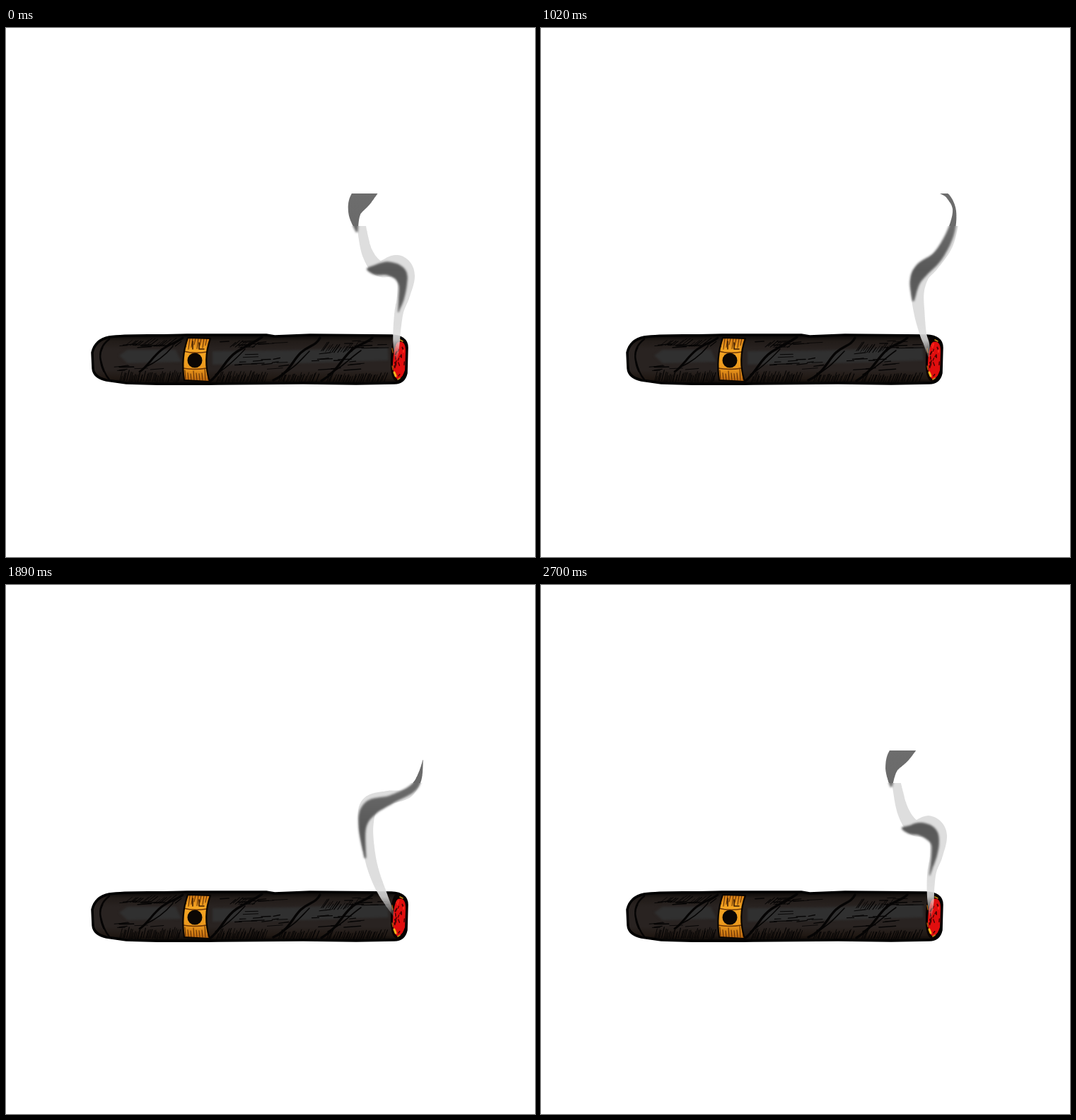
Animation, 748 px wide and 748 px high, one loop 2.73 s. Source, as an HTML page with a canvas:

```html
<!DOCTYPE html>
<html lang="en">
<head>
<meta charset="utf-8">
<title>Smoking cigar</title>
<style>
html, body { margin: 0; width: 100%; height: 100%; overflow: hidden; background: #fff; }
canvas { position: absolute; left: 0; top: 0; width: 748px; height: 748px; }
</style>
</head>
<body>
<canvas id="cigar" width="748" height="748"></canvas>
<canvas id="smoke" width="748" height="748"></canvas>
<script>
const LOOP = 2730, STEP = 30;

function drawCigar(c) {
  let seed = 11;
  const rnd = () => (seed = (seed * 16807) % 2147483647) / 2147483647;
  const body = new Path2D('M146 437C175 433 210 436 256 434L368 434 380 436 430 434 545 435Q567 436 567 452L566 488Q563 502 549 502L495 503 420 502 300 503Q215 504 170 502L142 498Q124 494 123 481L122 459Q126 441 146 437Z');
  const line = (d, w, color = '#050404') => {
    c.strokeStyle = color;
    c.lineWidth = w;
    c.stroke(new Path2D(d));
  };
  const fill = (d, color) => {
    c.fillStyle = color;
    c.fill(new Path2D(d));
  };
  // short strokes scattered in a slanted strip
  const hatch = (x, y, w, n, len, slope) => {
    for (let i = 0; i < n; i++) {
      const px = x + w * i / n + rnd() * 2, l = len * (.5 + rnd() * .5);
      line(`M${px} ${y + rnd() * 3}l${l * slope} ${-l}`, .8 + rnd() * .5);
    }
  };
  const grain = (x, y, w, h, n) => {
    for (let i = 0; i < n; i++)
      line(`M${x + rnd() * w} ${y + rnd() * h}l${8 + rnd() * 18} ${-2 + rnd() * 2}`, .8 + rnd() * .7);
  };

  c.lineCap = c.lineJoin = 'round';
  c.save();
  c.clip(body);
  const tone = c.createLinearGradient(0, 434, 0, 504);
  [[0, '#080605'], [.12, '#211b18'], [.3, '#292321'], [.7, '#292321'], [.88, '#201813'], [1, '#060403']]
    .forEach(([p, col]) => tone.addColorStop(p, col));
  c.fillStyle = tone;
  c.fillRect(110, 425, 470, 90);

  c.filter = 'blur(1.5px)';
  fill('M160 463L172 455 240 455 248 472 172 474Z', '#303030');
  fill('M292 457L400 456 540 451 541 470 420 474 292 476Z', '#303030');
  c.filter = 'none';

  hatch(170, 447, 72, 17, 9, 1.3);
  hatch(160, 498, 86, 36, 15, .25);
  hatch(296, 499, 70, 30, 15, .35);
  hatch(445, 456, 45, 15, 13, .7);
  hatch(452, 499, 84, 32, 13, .4);
  hatch(384, 498, 55, 20, 14, .4);
  hatch(316, 449, 35, 9, 9, 1.2);
  grain(300, 442, 80, 12, 9);
  grain(320, 460, 85, 25, 14);
  grain(415, 460, 95, 25, 12);
  grain(475, 441, 60, 12, 8);
  grain(150, 446, 60, 8, 8);
  grain(150, 478, 80, 8, 8);

  line('M189 486C200 479 207 465 220 455S242 445 250 438', 3);
  line('M196 480C214 472 226 462 236 450', 1.6);
  line('M288 500C305 487 309 469 326 458S348 447 362 437', 3.4);
  line('M296 490C312 481 325 468 338 454', 1.5);
  line('M378 498C400 489 405 470 417 459S438 450 444 438', 3.4);
  line('M387 492C407 482 416 470 429 457', 1.6);
  line('M446 499C468 486 474 469 487 457S507 448 518 438', 3.4);
  line('M455 490C476 480 482 470 502 456', 1.6);
  line('M146 440Q130 452 134 470T146 497', 2.4);
  line('M137 452Q129 467 138 486', 1.3);
  c.restore();
  line('M146 437C175 433 210 436 256 434L368 434 380 436 430 434 545 435Q567 436 567 452L566 488Q563 502 549 502L495 503 420 502 300 503Q215 504 170 502L142 498Q124 494 123 481L122 459Q126 441 146 437Z', 3.5, '#000');

  // band
  const band = 'M257 438L289 439Q278 469 288 500L252 498Q247 467 257 438Z';
  const gold = c.createLinearGradient(0, 438, 0, 500);
  [[0, '#d27a14'], [.3, '#f5a623'], [.7, '#eb981d'], [1, '#b9640d']]
    .forEach(([p, col]) => gold.addColorStop(p, col));
  fill(band, gold);
  c.save();
  c.clip(new Path2D(band));
  for (let i = 0; i < 9; i++) {
    const x = 254 + i * 4;
    line(`M${x + 2} 439l-2 ${8 + rnd() * 8}`, 1, '#5b2c05');
    line(`M${x} 498l-1 ${-8 - rnd() * 9}`, 1, '#5b2c05');
  }
  line('M251 457Q266 461 284 458M250 481Q266 484 284 481', 1.4, '#6d3606');
  line('M264 443L264 454 M273 445L273 454 280 454', 1.6, '#3b1c04');
  c.restore();
  line(band, 2.2, '#090502');
  c.fillStyle = '#0b0704';
  c.beginPath();
  c.arc(267, 470, 10.5, 0, 7);
  c.fill();

  // ember
  fill('M550 438Q565 437 566 454L565 488Q561 500 552 500Q543 496 544 470Q544 446 550 438Z', '#0a0302');
  const ember = new Path2D('M554 444Q565 441 565 457L564 484Q560 496 554 497Q547 493 547 474Q548 451 554 444Z');
  c.save();
  c.clip(ember);
  c.fillStyle = '#e00e0e';
  c.fillRect(540, 436, 30, 70);
  for (let i = 0; i < 26; i++) {
    const x = 546 + rnd() * 19, y = 443 + rnd() * 54;
    line(`M${x} ${y}l${rnd() * 4 - 2} ${2 + rnd() * 4}`, 1.2 + rnd(), i % 3 ? '#4d0303' : '#ff2a1c');
  }
  c.restore();
  line('M549 487l2 5', 3, '#f0b51d');
  line('M557 441l4 2M554 497l3-2', 1.6, '#c58a16');
  line('M546 453l1 6M546 478l1 5', 1.4, '#a05a0c');
}

// Each pose lists x, y, half width along a strand; nodes above it trail upwards,
// nodes below it wait at its lower end.
function makeStrand(count) {
  const poses = [];
  return {
    pose(time, start, v, rise = 20) {
      const last = v.length / 3 - 1, nodes = [];
      for (let i = 0; i < count; i++) {
        const k = Math.min(Math.max(i - start, 0), last) * 3;
        nodes.push([v[k], v[k + 1] - Math.max(start - i, 0) * rise, v[k + 2]]);
      }
      poses.push({ time, nodes });
      return this;
    },
    at(t) {
      const j = poses.findIndex(p => p.time > t);
      if (j < 1) return null;
      const a = poses[j - 1], b = poses[j], f = (t - a.time) / (b.time - a.time);
      return a.nodes.map((n, i) => n.map((v, k) => v + (b.nodes[i][k] - v) * f));
    }
  };
}

const first = [500,262,6, 503,283,6.5, 511,318,8, 528,340,11, 553,336,15, 565,350,13, 562,378,9, 556,400,6.5, 553,425,5.5, 552,448,4.5, 552,470,1.5];
const pale = makeStrand(21)
  .pose(0, 0, first)
  .pose(300, 1, [505,268,3, 513,292,6, 530,307,12, 554,299,14, 574,302,14, 571,330,9, 558,360,6.5, 555,395,6, 555,425,5.5, 554,448,4.5, 553,470,1.5])
  .pose(750, 4, [570,238,6, 588,262,5, 584,288,6, 570,322,8, 552,350,12, 545,370,11, 544,398,7.5, 545,430,6, 547,462,1.5])
  .pose(1260, 6, [586,270,4, 578,296,7, 555,319,8, 530,330,13, 522,352,11, 526,380,9, 534,405,8, 544,435,6, 549,464,1.5])
  .pose(1890, 7, [586,268,4, 570,294,6, 540,301,10, 514,312,13, 509,340,10.5, 513,375,8.5, 520,405,7.5, 532,435,6, 548,466,1.5])
  .pose(2400, 9, [548,262,5, 512,270,12, 508,300,8, 510,335,8, 519,364,9, 537,382,11, 549,393,11, 551,420,8.5, 550,448,5.5, 550,470,1.5])
  .pose(2700, 10, [500,262,6, 503,283,6.5, 512,320,8.5, 528,343,11, 549,341,14.5, 561,354,13, 559,382,9, 553,404,6.5, 551,426,5.5, 551,448,4.5, 551,470,1.5])
  .pose(LOOP, 10, first);

// A shadow lives longer than one loop, so its times run past both ends.
const shade = makeStrand(9)
  .pose(-560, 8, [547,440,.2], 3)
  .pose(-330, 0, [510,372,1, 517,382,5, 530,389,7, 540,398,8, 545,413,5, 547,428,3, 548,445,1])
  .pose(-30, 0, [512,344,2, 522,346,6, 536,345,9, 550,351,10, 557,364,6, 556,382,4, 550,408,1])
  .pose(0, 0, [512,341,2, 523,342,7, 540,340,9.5, 556,347,10, 561,362,6, 559,382,4, 555,400,1])
  .pose(300, 0, [515,311,3, 527,311,9, 543,304,9, 560,300,8, 571,310,7, 569,330,5, 555,362,1.5])
  .pose(750, 0, [525,247,2, 540,251,4, 565,244,5.5, 584,265,5, 578,295,6.5, 565,328,8, 550,350,10.5, 542,368,7.5, 538,394,1.5])
  .pose(1260, 3, [585,253,.3, 579,287,5, 557,318,7, 529,334,10, 517,351,7, 516,378,1.5])
  .pose(1890, 3, [590,245,.3, 579,283,5, 545,303,6, 515,316,11, 504,342,5.5, 508,386,1.5])
  .pose(2400, 3, [585,241,.3, 572,258,4.5, 545,263,4.5, 514,270,11, 503,290,6.5, 502,323,1.5])
  .pose(2700, 5, [535,214,6, 510,236,15, 496,258,9, 495,285,1.5])
  .pose(2730, 5, [530,214,6, 505,237,15, 493,260,9, 496,288,1.5])
  .pose(3010, 6, [480,180,12, 476,213,9, 482,232,1]);

const spline = (a, b, c, d, t) =>
  b + .5 * t * (c - a + t * (2 * a - 5 * b + 4 * c - d + t * (3 * (b - c) + d - a)));

function ribbon(nodes) {
  const path = new Path2D(), n = nodes.length, get = i => nodes[Math.min(Math.max(i, 0), n - 1)];
  for (let i = 0; i < n - 1; i++) {
    const q = [get(i - 1), get(i), get(i + 1), get(i + 2)];
    for (let s = 0; s < 20; s++) {
      const [x, y, r] = [0, 1, 2].map(k => spline(q[0][k], q[1][k], q[2][k], q[3][k], s / 20));
      if (r < .5) continue;
      path.moveTo(x + r, y);
      path.arc(x, y, r, 0, 2 * Math.PI);
    }
  }
  return path;
}

const ctx = document.getElementById('smoke').getContext('2d');
const fade = (y0, y1, stops) => {
  const g = ctx.createLinearGradient(0, y0, 0, y1);
  stops.forEach(([p, col]) => g.addColorStop(p, col));
  return g;
};
const paleFill = fade(420, 472, [[0, '#dedede'], [.4, 'rgba(222,222,222,.85)'], [1, 'rgba(222,222,222,0)']]);
const shadeFill = fade(234, 450, [[0, '#6d6d6d'], [.25, '#696969'], [.5, '#585858'], [.8, '#606060'], [1, 'rgba(100,100,100,.4)']]);

function paint(path, color, top, bottom, blur) {
  ctx.save();
  ctx.beginPath();
  ctx.rect(0, top, 748, bottom - top);
  ctx.clip();
  if (blur) ctx.filter = `blur(${blur}px)`;
  ctx.fillStyle = color;
  ctx.fill(path);
  ctx.restore();
}

function render(t) {
  ctx.clearRect(0, 0, 748, 748);
  paint(ribbon(pale.at(t)), paleFill, 280, 480);
  for (const shift of [-LOOP, 0, LOOP]) {
    const nodes = shade.at(t + shift);
    if (!nodes) continue;
    const path = ribbon(nodes);
    paint(path, shadeFill, 234, 280);
    paint(path, shadeFill, 280, 480, 1.6);
  }
}

drawCigar(document.getElementById('cigar').getContext('2d'));
const begin = performance.now();
function tick() {
  const t = (performance.now() - begin) % LOOP;
  render(Math.floor(t / STEP) * STEP);
  requestAnimationFrame(tick);
}
tick();
</script>
</body>
</html>
```
